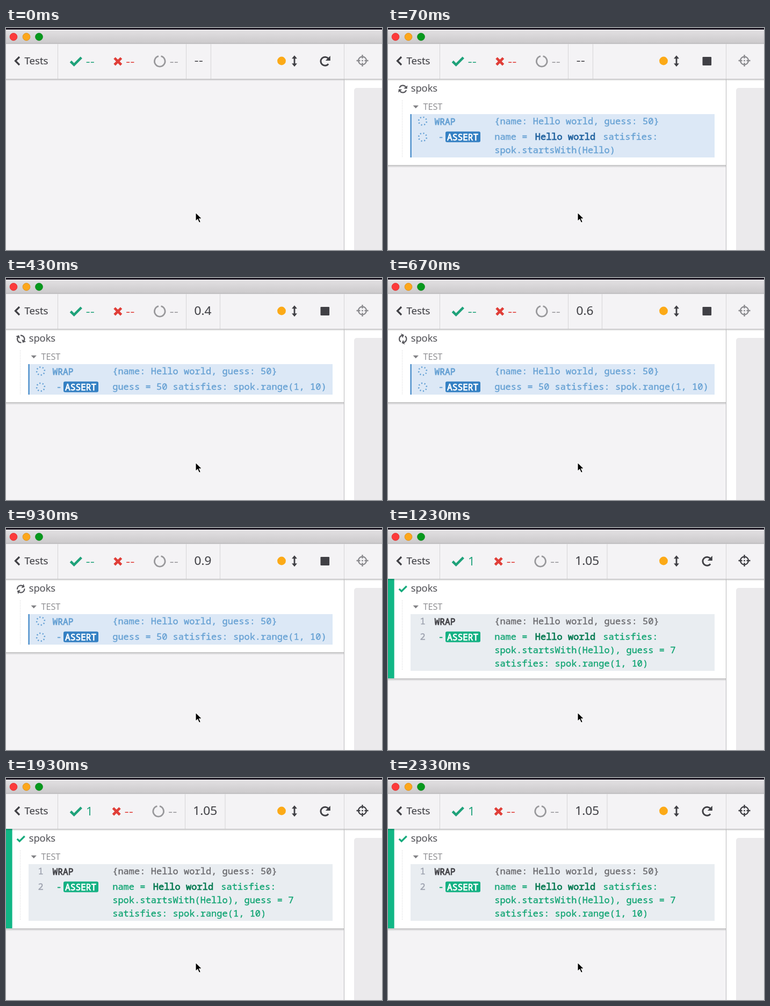
Write an HTML page that moves like this. It is 700 px wide and 415 px high and loops after 2.36 s.

```html
<!DOCTYPE html>
<html lang="en">
<head>
<meta charset="utf-8">
<title>Test runner</title>
<style>
  html, body { margin: 0; width: 100%; height: 100%; overflow: hidden; background: #f4f3f5; }
  svg { display: block; }
  text { font: 18.3px "Open Sans", sans-serif; white-space: pre; stroke-width: .2; }
  .back { font-size: 18.7px; }
  .dash { font: 18px Inter, sans-serif; }
  .num { font-size: 22.6px; }
  .code { font: 17.05px "Noto Sans Mono", monospace; stroke-width: .35; }
  .tag { font: 16.2px "Noto Sans Mono", monospace; }
  .bold, .tag { stroke-width: .8; }
  .line { fill: none; stroke: currentColor; }
</style>
</head>
<body>
<svg width="700" height="415" viewBox="0 0 700 415">
  <defs>
    <linearGradient id="title" x2="0" y2="1">
      <stop stop-color="#e3e1e3"/><stop offset="1" stop-color="#cbc9cb"/>
    </linearGradient>
    <linearGradient id="shade" x2="0" y2="1">
      <stop stop-color="#000" stop-opacity=".24"/><stop offset="1" stop-color="#000" stop-opacity="0"/>
    </linearGradient>
    <g id="sync">
      <g id="half">
        <path class="line" stroke-width="2.2" d="M-6.5-1.3A6.6 6.6 0 0 1 5-4.3"/>
        <path fill="currentColor" d="M7.7-7.6v6.4h-6.4z"/>
      </g>
      <use href="#half" transform="rotate(180)"/>
    </g>
    <circle id="dots" class="line" r="7.4" stroke-width="2.5" pathLength="80" stroke-dasharray="3.6 6.4"/>
    <g id="redo">
      <path class="line" stroke-width="3" d="M6.2-5A8 8 0 1 0 6.4 5.2"/>
      <path fill="currentColor" d="M10-10v9H1z"/>
    </g>
    <path id="stop" fill="currentColor" d="M-7-8H7a1.3 1.3 0 0 1 1.3 1.3V6.7A1.3 1.3 0 0 1 7 8H-7a1.3 1.3 0 0 1-1.3-1.3V-6.7A1.3 1.3 0 0 1-7-8z"/>
    <path id="check" class="line" stroke-width="4.6" d="M-10 .5L-3.6 6.8L10-6.8"/>
    <path id="cross" class="line" stroke-width="4.8" d="M-6.3-6.3L6.3 6.3M6.3-6.3L-6.3 6.3"/>
    <path id="notch" class="line" stroke-width="2.8" d="M-2.3-9.6A9.8 9.8 0 1 0 2.3-9.6"/>
    <g id="aim">
      <path class="line" stroke-width="2.3" d="M0-11V-4M0 4V11M-11 0H-4M4 0H11"/>
      <circle class="line" r="7.5" stroke-width="2.3"/>
      <circle r="1.5" fill="currentColor"/>
    </g>
  </defs>

  <path fill="#f4f3f5" d="M0 0H700V415H0z"/>
  <path fill="#fff" d="M630 96h70v319h-70z"/>
  <path fill="#ebeaec" d="M648 415V117a5 5 0 0 1 5-5h47v303z"/>
  <g id="report"></g>
  <path fill="#f4f3f5" d="M0 29H700V95H0z"/>
  <path fill="url(#shade)" d="M0 95H700v4H0z"/>
  <path fill="#1b1522" d="M0 0H700V3H0z"/>
  <path fill="url(#title)" d="M0 3H700V29H0z"/>
  <path fill="#f0eef0" d="M0 3H700v1H0z"/>
  <path fill="#a9a7a9" d="M0 28.5H700v1H0z"/>
  <g stroke-width=".8">
    <circle cx="14" cy="16.5" r="6.9" fill="#fc3b3b" stroke="#dc2c2e"/>
    <circle cx="38" cy="16.5" r="6.9" fill="#fca71c" stroke="#d98d16"/>
    <circle cx="61.5" cy="16.5" r="6.9" fill="#07991d" stroke="#058217"/>
  </g>
  <path fill="#b8b8ba" d="M629 96h1v319h-1z"/>
  <path fill="#d5d4d6" d="M96 30h1v65h-1zM629 30h1v65h-1z"/>
  <g color="#404045">
    <path class="line" stroke-width="3.2" d="M25 54L17.5 61.5L25 69"/>
    <text class="back" x="34.5" y="67.7" fill="currentColor" stroke="currentColor">Tests</text>
    <circle cx="513" cy="61.5" r="7.9" fill="#fcaa17"/>
    <path class="line" stroke-width="2.8" d="M537 56V68"/>
    <path fill="currentColor" d="M537 51.3l5 6h-10zM537 72.3l5-6h-10z"/>
  </g>
  <g id="toolbar"></g>
  <path d="M353 345v16.2l3.8-3.5l2.7 6.3l2.9-1.2l-2.7-6.2h5.2z" stroke="#fff" stroke-width="1.1"/>
</svg>

<script>
const LOOP = 2360, START = 30, NEXT = 110, DONE = 1050;
const DARK = '#404045', GRAY = '#98989b', GREEN = '#1fa27a', RED = '#e03e38';
const report = document.getElementById('report');
const toolbar = document.getElementById('toolbar');

const icon = (id, x, y, color, transform = '') =>
  `<use href="#${id}" color="${color}" transform="translate(${x} ${y}) ${transform}"/>`;
const text = (x, y, str, color, cls = '') =>
  `<text x="${x}" y="${y}" fill="${color}" stroke="${color}" class="${cls}">${str}</text>`;
const rect = (x, y, w, h, fill, r = 0) =>
  `<rect x="${x}" y="${y}" width="${w}" height="${h}" rx="${r}" fill="${fill}"/>`;

function drawToolbar(t) {
  const running = t >= START && t < DONE, done = t >= DONE;
  const timer = done ? '1.05' : t < 100 ? '--' : (Math.floor(t / 100) / 10).toFixed(1);
  const shift = done ? -2.6 : 0;
  const end = done ? 407.5 : timer === '--' ? 381 : 398;
  const divider = x => rect(x, 30, 1, 65, '#d5d4d6');
  return divider(done ? 333 : 335) + divider(end)
    + icon('check', 130.3, 62, GREEN)
    + (done ? text(149, 69.7, 1, GREEN, 'num') : text(148.5, 70, '--', GREEN, 'dash'))
    + icon('cross', 208.3 + shift, 62.4, RED) + text(223 + shift, 70, '--', RED, 'dash')
    + icon('notch', 286.3 + shift, 62.3, GRAY) + text(304.5 + shift, 70, '--', GRAY, 'dash')
    + (timer === '--' ? text(350.5, 68, timer, DARK, 'dash')
                      : text(done ? 348.3 : 350.5, 68.7, timer, DARK, 'num'))
    + icon(running ? 'stop' : 'redo', 593.8, 62, DARK)
    + icon('aim', 663.5, 61, done ? DARK : '#8c8c90');
}

function drawReport(t) {
  if (t < START) return '';
  const done = t >= DONE;
  const bottom = done ? 267 : t < NEXT ? 242 : 218;
  const c = done
    ? { row: '#e9edf1', name: DARK, value: '#69696d', pill: '#14b183', text: '#0fa472', strong: '#067a52' }
    : { row: '#dce8f6', name: '#65a0d3', value: '#65a0d3', pill: '#3480c3', text: '#65a0d3', strong: '#22639f' };
  const greeting = `name = <tspan class="bold" dx="4" fill="${c.strong}" stroke="${c.strong}">Hello world</tspan><tspan dx="4"> satisfies:</tspan>`;
  const lines = done
    ? [greeting, 'spok.startsWith(Hello), guess = 7', 'satisfies: spok.range(1, 10)']
    : t < NEXT ? [greeting, 'spok.startsWith(Hello)']
    : ['guess = 50 satisfies: spok.range(1, 10)'];
  const spin = `rotate(${(t - START) * 0.18})`;

  return rect(0, 96, 629, bottom - 81, '#fff')
    + rect(0, bottom + 14, 629, 5, 'url(#shade)')
    + (done ? rect(0, 95, 11.6, 186, '#11b786') + icon('check', 27.7, 113.5, '#14aa7c', 'scale(.7)')
            : icon('sync', 27.7, 114, '#56565b', spin))
    + text(42.7, 119.3, 'spoks', '#545459')
    + `<path d="M26.5 135V${bottom}" stroke="#cbcbce" stroke-dasharray="1 2"/>`
    + '<path fill="#818185" d="M46.5 144.7h10.4l-5.2 5.5z"/>'
    + '<text x="65.5" y="152.8" fill="#89898d" style="font-size:16.2px">TEST</text>'
    + rect(42, 161, 566, bottom - 161, c.row)
    + (done ? text(59.5, 179.7, 1, '#9a9fac', 'code') + text(59.5, 209, 2, '#9a9fac', 'code')
            : rect(41.5, 161, 2.2, bottom - 161, '#3c85c7')
              + icon('dots', 64.5, 174, '#5f9dd3', spin) + icon('dots', 64.5, 204, '#5f9dd3', spin))
    + text(86.5, 180.5, 'WRAP', c.name, 'tag')
    + text(198.2, 179.7, '{name: Hello world, guess: 50}', c.value, 'code')
    + text(93.5, 209, '-', c.text, 'code')
    + rect(107, 193.5, 65, 20, c.pill, 3)
    + text(110, 209.7, 'ASSERT', '#fff', 'tag')
    + lines.map((line, i) => text(198.2, 209 + i * 24.9, line, c.text, 'code')).join('');
}

function frame() {
  const t = performance.now() % LOOP;
  toolbar.innerHTML = drawToolbar(t);
  report.innerHTML = drawReport(t);
  requestAnimationFrame(frame);
}
frame();
</script>
</body>
</html>
```
